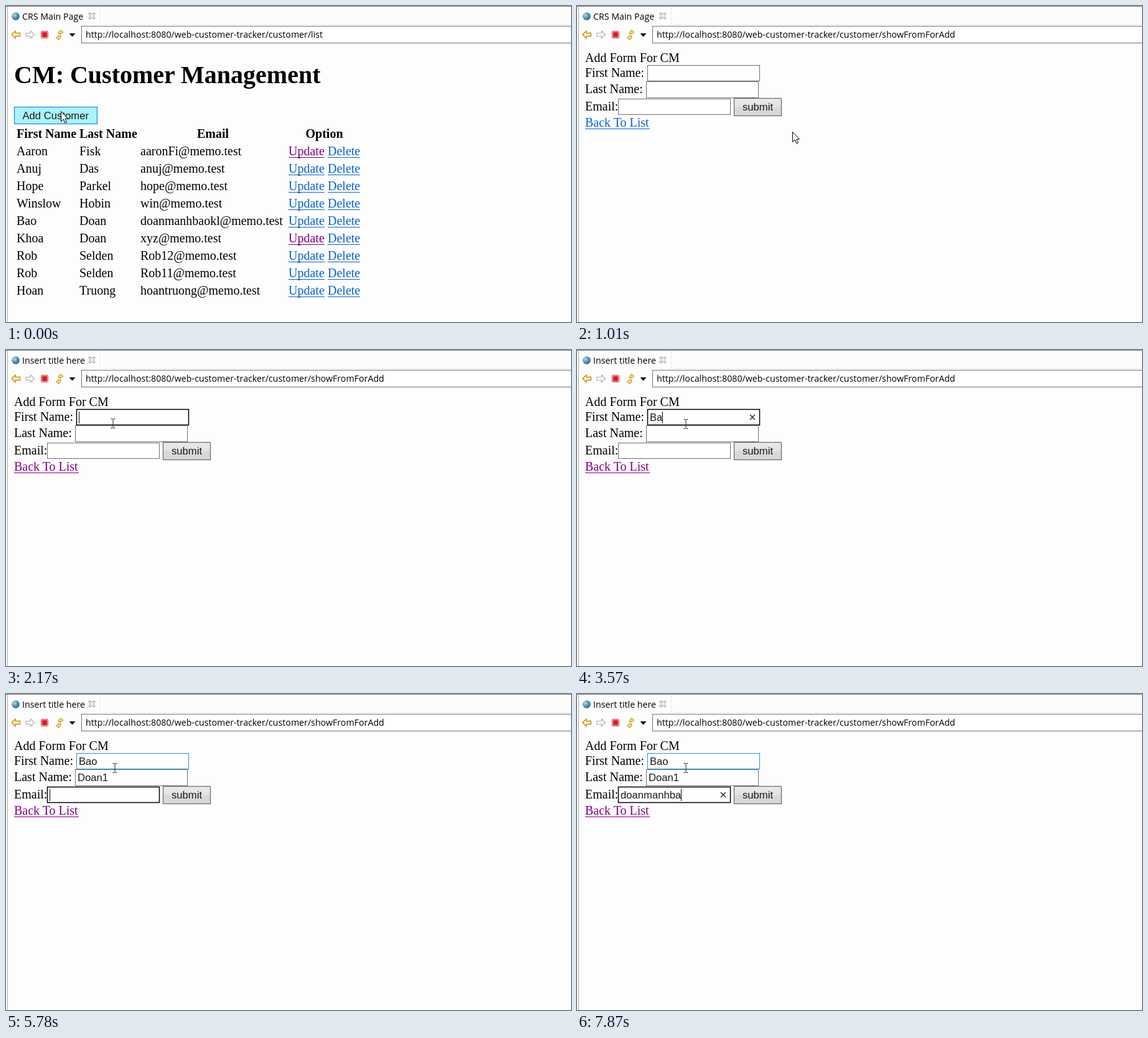
Recreate the animation shown at these times as an HTML page. Size 908 px wide and 508 px high, loop 7990 ms.

```html
<!DOCTYPE html>
<html lang="en">
<head>
<meta charset="utf-8">
<title>Customer form</title>
<style>
  html, body { margin: 0; width: 100%; height: 100%; overflow: hidden; background: #fdfdfd; }
  svg { display: block; }
  text { white-space: pre; }
  .serif { font: 20px "Liberation Serif", "Times New Roman", serif; fill: #000; }
  .bold { font-weight: bold; }
  .h1 { font-size: 40px; }
  .mid { text-anchor: middle; }
  .sans { font: 16.67px "Liberation Sans", Arial, sans-serif; fill: #1a1a1a; }
  .ui { font: 14.22px "Open Sans", "Noto Sans", sans-serif; fill: #000; }
  .link { fill: #0b62c8; }
  .link.visited { fill: #800080; }
  .box { fill: #fff; stroke: #707070; }
  .box.hover { stroke: #2a8dd4; }
  .box.focus { stroke: #000; stroke-width: 1.5; }
  .button { fill: url(#face); stroke: #707070; stroke-width: 1.3; }
  .button.hover { fill: #aaf3fe; stroke: #2a8dd4; }
</style>
</head>
<body>
<svg id="stage" width="908" height="508" viewBox="0 0 908 508">
  <defs>
    <linearGradient id="face" x2="0" y2="1">
      <stop offset="0" stop-color="#e9e9e9"/><stop offset=".5" stop-color="#e3e3e3"/>
      <stop offset=".5" stop-color="#dadada"/><stop offset="1" stop-color="#d7d7d7"/>
    </linearGradient>
    <radialGradient id="ball" cx=".35" cy=".35" r=".75">
      <stop offset="0" stop-color="#b9dcec"/><stop offset=".55" stop-color="#4f8fb5"/>
      <stop offset="1" stop-color="#2c5878"/>
    </radialGradient>
    <path id="back" d="M.5 6.5 6.500 .5V4H14V9H6.500V12.500Z"/>
  </defs>

  <rect width="908" height="508" fill="#fdfdfd"/>
  <path d="M0 .5H908" stroke="#777"/>
  <path d="M2.500 1V508" stroke="#aaa"/>
  <path d="M151.500 1V29.500H908" fill="none" stroke="#e8e8e8"/>

  <circle cx="15.500" cy="16.500" r="6.300" fill="url(#ball)"/>
  <text id="tab" class="ui" x="26" y="22"></text>
  <path d="M133.500 11.500h2.500l2 2.500 2-2.500h2.500v2l-2.500 2.500 2.500 2.500v2h-2.500l-2-2.500-2 2.500h-2.500v-2l2.500-2.500-2.500-2.500z"
        fill="#fff" stroke="#777" stroke-width=".9"/>

  <use href="#back" x="8.500" y="39.500" fill="#fff3c4" stroke="#c48a16" stroke-width="1.300"/>
  <use href="#back" transform="translate(46 39.500) scale(-1 1)" fill="#fafafa" stroke="#b4b4b4" stroke-width="1.200"/>
  <rect x="56.500" y="40.500" width="11" height="11" rx="1" fill="#f3c2c4" stroke="#cf4650"/>
  <rect x="58" y="42" width="8" height="8" fill="#dc1f2c"/>
  <g fill="#f8dc85" stroke="#c48a16">
    <path id="turn" d="M84.500 45c-.5-3.500 1-5 3-5v-1.500l4.500 3.500-4.500 3.500v-1.500c-1 0-1.500 .2-1.500 1.500z"/>
    <use href="#turn" transform="rotate(180 86.200 46.500)"/>
  </g>
  <path d="M101.500 44h10l-5 5.500z"/>
  <rect x="121.500" y="32.500" width="800" height="27" fill="#fff" stroke="#737373"/>
  <text id="url" class="ui" x="128" y="51"></text>

  <g id="list">
    <text class="serif bold h1" x="13" y="124">CM: Customer Management</text>
    <rect id="add" class="button" x="13.500" y="162.500" width="133" height="27"/>
    <text class="sans" x="26.500" y="182">Add Customer</text>
  </g>

  <g id="form">
    <text class="serif" x="13" y="90">Add Form For CM</text>
    <rect class="button" x="252.500" y="148.500" width="76" height="28"/>
    <text class="sans" x="266" y="168">submit</text>
  </g>

  <path id="arrow" d="M.5 .5V16.500L4.300 13 7 19 9.500 18 6.900 12H11.500Z" fill="#fff" stroke="#000"/>
  <path id="beam" d="M-3.500-7.500H-1L0-6.500 1-7.500H3.500M0-6.500V6.500M-3.500 7.500H-1L0 6.500 1 7.500H3.500" fill="none" stroke="#222"/>
</svg>

<script>
const LOOP = 7990;
const BASE = "http://localhost:8080/web-customer-tracker/customer/";
const $ = id => document.getElementById(id);

function add(parent, tag, attrs, content = "") {
  const el = document.createElementNS("http://www.w3.org/2000/svg", tag);
  for (const key in attrs) el.setAttribute(key, attrs[key]);
  el.textContent = content;
  parent.append(el);
  return el;
}

const label = (parent, x, y, content, cls = "") =>
  add(parent, "text", { x, y, class: "serif " + cls }, content);

function link(parent, x, y, width, content, visited) {
  const g = add(parent, "g", { class: "link" + (visited ? " visited" : "") });
  label(g, x, y, content).style.fill = "inherit";
  add(g, "rect", { x, y: y + 3, width, height: 1 });
  return g;
}

// Customer table
const people = [
  ["Aaron", "Fisk", "aaronFi"], ["Anuj", "Das", "anuj"], ["Hope", "Parkel", "hope"],
  ["Winslow", "Hobin", "win"], ["Bao", "Doan", "doanmanhbaokl"], ["Khoa", "Doan", "xyz"],
  ["Rob", "Selden", "Rob12"], ["Rob", "Selden", "Rob11"], ["Hoan", "Truong", "hoantruong"]
];
label($("list"), 17, 212, "First Name", "bold");
label($("list"), 118, 212, "Last Name", "bold");
label($("list"), 332.5, 212, "Email", "bold mid");
label($("list"), 511.5, 212, "Option", "bold mid");
people.forEach(([first, last, mail], i) => {
  const y = 240 + 28 * i;
  label($("list"), 17, y, first);
  label($("list"), 118, y, last);
  label($("list"), 216, y, mail + "@memo.test");
  link($("list"), 454, y, 58, "Update", i === 0 || i === 5);
  link($("list"), 517, y, 52, "Delete");
});

// Form fields
function field(name, x, y, height, base) {
  label($("form"), 13, base, name);
  const box = add($("form"), "rect", { x: x + .5, y: y + .5, width: 180, height });
  const text = add($("form"), "text", { x: x + 4, y: base, class: "sans" });
  const caret = add($("form"), "rect", { x: x + 4, y: base - 15, width: 1, height: 19 });
  const clear = add($("form"), "path", {
    d: `M${x + 165} ${base - 10}l8 8m0-8l-8 8`, stroke: "#222", "stroke-width": 1.4
  });
  return { x, box, text, caret, clear };
}
const fields = {
  first: field("First Name:", 113, 95, 25, 114),
  last: field("Last Name:", 111, 121, 26, 140),
  mail: field("Email:", 66, 149, 25, 168)
};
const backLink = link($("form"), 13, 194, 104, "Back To List");

// Each cue changes part of the state from its time on.
const start = {
  page: "list", tab: "CRS Main Page", hover: "add", cursor: "arrow", at: [88, 169],
  focus: "", caret: false, visited: false, first: "", last: "", mail: ""
};
const typing = (name, word, times) =>
  times.map((t, i) => [t, { [name]: word.slice(0, i + 1), caret: true }]);

const cues = [
  [560, { hover: "", at: [170, 172] }],
  [710, { at: [290, 182] }],
  [860, { at: [346, 186] }],
  [1010, { page: "form", at: [346, 202] }],
  [1170, { tab: "Insert title here", visited: true }],
  [1470, { at: [338, 210] }],
  [1600, { at: [262, 190] }],
  [1730, { cursor: "beam", at: [198, 160], hover: "mail" }],
  [1870, { at: [172, 118], hover: "first" }],
  [2170, { focus: "first", caret: true }],
  [2300, { at: [175, 119] }],
  [2720, { caret: false }],
  [3150, { caret: true }],
  ...typing("first", "Bao", [3430, 3570, 3720]),
  [4130, { focus: "last" }],
  ...typing("last", "Doan1", [4520, 4670, 4790, 4910, 5030]),
  [5620, { caret: false }],
  [5780, { focus: "mail", caret: true }],
  ...typing("mail", "doanmanhba", [6360, 6500, 6640, 6790, 6930, 7330, 7470, 7610, 7740, 7870])
];

const show = (el, on) => el.setAttribute("visibility", on ? "inherit" : "hidden");

function draw(t) {
  const s = Object.assign({}, start, ...cues.filter(c => c[0] <= t).map(c => c[1]));
  show($("list"), s.page === "list");
  show($("form"), s.page === "form");
  $("tab").textContent = s.tab;
  $("url").textContent = BASE + (s.page === "list" ? "list" : "showFromForAdd");
  $("add").classList.toggle("hover", s.hover === "add");
  backLink.classList.toggle("visited", s.visited);

  for (const name in fields) {
    const f = fields[name], focused = s.focus === name;
    f.box.setAttribute("class", "box" + (focused ? " focus" : s.hover === name ? " hover" : ""));
    f.text.textContent = s[name];
    const width = s[name] ? f.text.getComputedTextLength() : 0;
    f.caret.setAttribute("x", Math.round(f.x + 4 + width));
    show(f.caret, focused && s.caret);
    show(f.clear, focused && s[name]);
  }

  for (const kind of ["arrow", "beam"]) {
    show($(kind), s.cursor === kind);
    $(kind).setAttribute("transform", `translate(${s.at})`);
  }
}

const origin = performance.now();
function tick() {
  draw((performance.now() - origin) % LOOP);
  requestAnimationFrame(tick);
}
tick();
</script>
</body>
</html>
```
